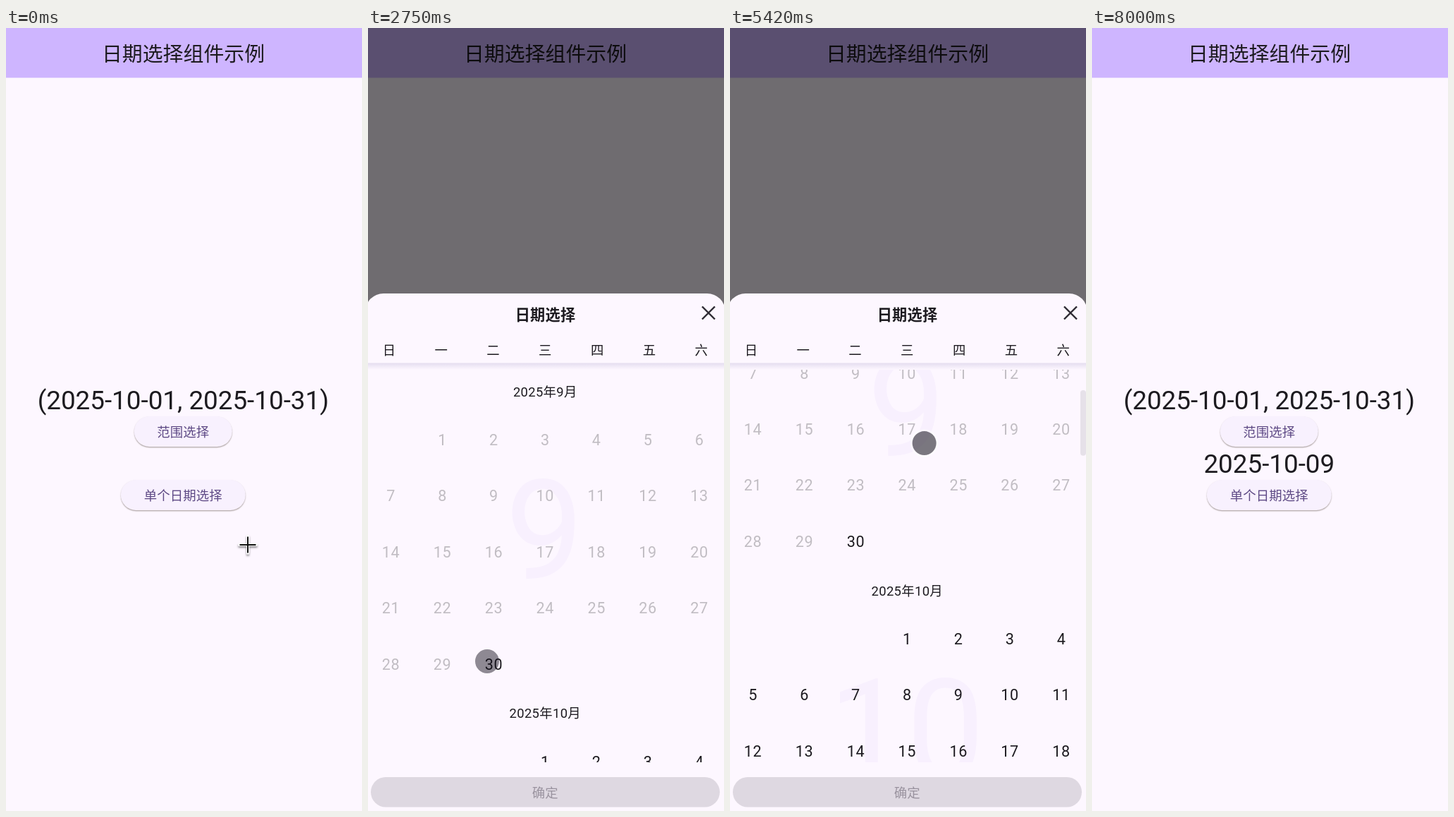
Animation, 505 px wide and 1109 px high, one loop 8580 ms. Source, as an HTML page with a canvas:

```html
<!DOCTYPE html>
<html lang="zh-CN">
<head>
<meta charset="utf-8">
<style>
html, body { margin: 0; width: 100%; height: 100%; overflow: hidden; background: #fdf7ff; }
canvas { display: block; }
</style>
</head>
<body>
<canvas width="505" height="1109"></canvas>
<script>
const ctx = document.querySelector('canvas').getContext('2d');
const W = 505, H = 1109, LOOP = 8580, STEP = 1000 / 12;
const SURFACE = '#fdf7ff', INK = '#1d1b20', PURPLE = '#5e4a85', FADED = '#c1bdc3';
const CENTER = 251.3, SHEET_TOP = 376, SHEET_HEIGHT = H - SHEET_TOP;
const LIST_TOP = 484, LIST_HEIGHT = 556, COLUMN = 72.9, ROW = 79.45;
const POINTER_GONE = 7990;

const SHEETS = [
  { open: 1508.5, select: 3083, confirm: 3750, close: 3920, month: 9, day: 30, result: '2025-09-30' },
  { open: 4800, select: 6417, confirm: 7000, close: 7420, month: 10, day: 9, result: '2025-10-09' }
];
const DRAG = { from: 5167, to: 5569, startY: 762, endY: 482, fling: 65, settle: 500 };
const MONTHS = [
  { name: 9, first: 1, days: 30, enabledFrom: 30 },
  { name: 10, first: 3, days: 31, enabledFrom: 1 }
];

// The pointer rests between moves; bow bends a move sideways.
const START = { x: 343, y: 732 };
const MOVES = [
  { from: 250, to: 667, x: 284, y: 662 },
  { from: 1083, to: 1333, x: 229, y: 660 },
  { from: 1917, to: 2417, x: 222, y: 897, bow: 200 },
  { from: 2583, to: 2750, x: 169, y: 897 },
  { from: 3083, to: 3500, x: 300, y: 1070 },
  { from: 4083, to: 4583, x: 264, y: 667 },
  { from: 4833, to: 5083, x: 275, y: DRAG.startY },
  { from: DRAG.from, to: DRAG.to, x: 276, y: DRAG.endY },
  { from: 5667, to: 6083, x: 324, y: 773 },
  { from: 6417, to: 6833, x: 300, y: 1070 },
  { from: 7750, to: 7917, x: 325, y: 1084 }
];

const progress = (t, from, length) => Math.max(0, Math.min(1, (t - from) / length));
const openTap = sheet => sheet.open - 130;

function pointerAt(t) {
  let { x, y } = START;
  for (const m of MOVES) {
    const p = progress(t, m.from, m.to - m.from);
    const bow = (m.bow || 0) * Math.sin(Math.PI * p);
    x += (m.x - x) * p + bow;
    y += (m.y - y) * p + bow * 0.6;
  }
  return { x, y };
}

function isPressed(t) {
  const within = (a, b) => t >= a - 1 && t < b;
  return within(DRAG.from - STEP, DRAG.to) || SHEETS.some(s =>
    within(openTap(s), s.open) || within(s.select - STEP, s.select) || within(s.confirm, s.close + STEP));
}

function scrollAt(t) {
  const dragged = (DRAG.startY - DRAG.endY) * progress(t, DRAG.from, DRAG.to - DRAG.from);
  return dragged + DRAG.fling * (1 - (1 - progress(t, DRAG.to, DRAG.settle)) ** 3);
}

function bezier(x1, y1, x2, y2) {
  const at = (s, a, b) => 3 * (1 - s) ** 2 * s * a + 3 * (1 - s) * s * s * b + s ** 3;
  return x => {
    let lo = 0, hi = 1;
    for (let i = 0; i < 24; i++) {
      const mid = (lo + hi) / 2;
      if (at(mid, x1, x2) < x) lo = mid; else hi = mid;
    }
    return at(hi, y1, y2);
  };
}
const slide = bezier(0, 0, 0.2, 1), fade = bezier(0.25, 0.25, 0.25, 1);

function text(str, x, y, size, color, spacing = 0, weight = 400) {
  ctx.font = `${weight} ${size}px Roboto, "Noto Sans CJK SC", sans-serif`;
  ctx.letterSpacing = spacing + 'px';
  ctx.textAlign = 'center';
  ctx.fillStyle = color;
  ctx.fillText(str, x, y + size * 0.37);
}

function box(x, y, w, h, r, color) {
  ctx.beginPath();
  ctx.roundRect(x, y, w, h, r);
  ctx.fillStyle = color;
  ctx.fill();
}

function disc(x, y, r, color) {
  ctx.beginPath();
  ctx.arc(x, y, r, 0, 7);
  ctx.fillStyle = color;
  ctx.fill();
}

function lines(color, width, ...ends) {
  ctx.strokeStyle = color;
  ctx.lineWidth = width;
  ctx.beginPath();
  for (const [x1, y1, x2, y2] of ends) { ctx.moveTo(x1, y1); ctx.lineTo(x2, y2); }
  ctx.stroke();
}

function clipped(x, y, w, h, r, draw) {
  ctx.save();
  ctx.beginPath();
  ctx.roundRect(x, y, w, h, r);
  ctx.clip();
  draw();
  ctx.restore();
}

function pageButton(label, y, w) {
  const x = CENTER - w / 2;
  ctx.save();
  ctx.shadowColor = 'rgba(60,45,30,.4)';
  ctx.shadowBlur = 1.5;
  ctx.shadowOffsetY = 1.2;
  box(x, y, w, 43, 21.5, '#f8f1fe');
  ctx.restore();
  text(label, CENTER, y + 22, 18.4, PURPLE, 0.13);
}

function drawPage(t) {
  ctx.fillStyle = SURFACE;
  ctx.fillRect(0, 0, W, H);
  ctx.fillStyle = '#ceb5ff';
  ctx.fillRect(0, 0, W, 70.5);
  text('日期选择组件示例', 251.5, 36, 28.9, INK);
  text('(2025-10-01, 2025-10-31)', CENTER, 526, 36.8, INK);
  const done = SHEETS.filter(s => t >= s.close).pop();
  if (done) text(done.result, CENTER, 616, 36.8, INK);
  pageButton('范围选择', 550, 139);
  pageButton('单个日期选择', 640, 177);

  const tapped = SHEETS.find(s => t >= openTap(s) && t < s.open + 130);
  if (tapped) clipped(163, 640, 177, 43, 21.5, () => {
    const { x, y } = pointerAt(t);
    ctx.fillStyle = 'rgba(94,74,133,.08)';
    ctx.fillRect(0, 0, W, H);
    disc(x, y, (t - openTap(tapped)) * 0.41, 'rgba(94,74,133,.12)');
  });
}

function drawMonth(month, y, selectedDay) {
  text(month.name, CENTER - 1, y + 192, 197, '#f8f0fe');
  text(`2025年${month.name}月`, CENTER, y, 18.4, INK, 0.33);
  for (let day = 1; day <= month.days; day++) {
    const cell = day - 1 + month.first;
    const cx = CENTER + (cell % 7 - 3) * COLUMN, cy = y + 68 + Math.floor(cell / 7) * ROW;
    const selected = day === selectedDay;
    if (selected) box(cx - COLUMN / 2, cy - ROW / 2, COLUMN, ROW, 5, PURPLE);
    text(day, cx, cy, 21.6, selected ? '#fff' : day < month.enabledFrom ? FADED : INK, 0.6);
  }
}

function drawList(t, sheet) {
  const scrolled = sheet.open < DRAG.from && DRAG.from < sheet.close;
  const offset = scrolled ? scrollAt(t) : 0;
  clipped(0, LIST_TOP, W, LIST_HEIGHT, 0, () => {
    MONTHS.forEach((m, i) => {
      const selectedDay = t >= sheet.select && m.name === sheet.month ? sheet.day : 0;
      drawMonth(m, 515 + i * 455.6 - offset, selectedDay);
    });
    if (offset > 0) {
      ctx.globalAlpha = 1 - progress(t, 6400, 300);
      box(497, LIST_TOP + offset / 6, 8, LIST_HEIGHT / 6, 4, '#e6e1e9');
    }
  });
}

function drawConfirm(t, sheet) {
  const bar = [4, 1061, 495, 42.5, 21.2];
  const enabled = progress(t, sheet.select - 60, 200);
  box(...bar, '#ded8e1');
  ctx.globalAlpha = enabled;
  box(...bar, PURPLE);
  ctx.globalAlpha = 1;
  const age = t - sheet.close + 4;
  if (age >= 0) clipped(...bar, () => disc(298, 1071, 79 + age * 0.5, 'rgba(255,255,255,.09)'));
  text('确定', CENTER, 1083, 18.4, enabled > 0.5 ? '#fff' : '#9a939f', 0.13);
}

function drawSheet(t, sheet) {
  const shown = progress(t, sheet.open, 250) - progress(t, sheet.close, 160);
  if (shown <= 0) return;
  ctx.fillStyle = `rgba(0,0,0,${0.56 * fade(shown)})`;
  ctx.fillRect(0, 0, W, H);
  ctx.save();
  ctx.translate(0, (1 - slide(shown)) * SHEET_HEIGHT);
  box(-4, SHEET_TOP, 511, H, 26, SURFACE);
  text('日期选择', 251.5, 406, 21.2, INK, 0.2, 700);
  lines('#2b2730', 2.4, [474, 394.5, 492, 412.5], [492, 394.5, 474, 412.5]);
  [...'日一二三四五六'].forEach((d, i) => text(d, CENTER + (i - 3) * 73.8, 456, 18.4, INK));
  const shade = ctx.createLinearGradient(0, 474.5, 0, LIST_TOP);
  shade.addColorStop(0, 'rgba(90,75,150,.15)');
  shade.addColorStop(1, 'rgba(90,75,150,0)');
  ctx.fillStyle = shade;
  ctx.fillRect(0, 474.5, W, LIST_TOP - 474.5);
  drawList(t, sheet);
  drawConfirm(t, sheet);
  ctx.restore();
}

function drawCross(x, y) {
  const arms = [[x - 11.5, y, x + 11.5, y], [x, y - 11.5, x, y + 11.5]];
  ctx.save();
  ctx.shadowColor = 'rgba(0,0,0,.45)';
  ctx.shadowBlur = 3;
  ctx.shadowOffsetY = 2;
  ctx.lineCap = 'square';
  lines('#fff', 4, ...arms);
  ctx.restore();
  lines('#111', 2, ...arms);
}

function drawPointer(t) {
  if (t > POINTER_GONE) return;
  const { x, y } = pointerAt(t);
  if (t <= MOVES[0].from) return drawCross(x, y);
  const pressed = isPressed(t);
  if (pressed) disc(x, y, 20, 'rgba(255,255,255,.4)');
  disc(x, y, 17, `rgba(12,8,20,${pressed ? 0.54 : 0.46})`);
}

const begin = performance.now();
function tick() {
  // Twelve pictures a second; the small lead absorbs rounding to 10 ms.
  const t = Math.floor(((performance.now() - begin) % LOOP + 4) / STEP) * STEP;
  drawPage(t);
  SHEETS.forEach(sheet => drawSheet(t, sheet));
  drawPointer(t);
  requestAnimationFrame(tick);
}
tick();
</script>
</body>
</html>
```
